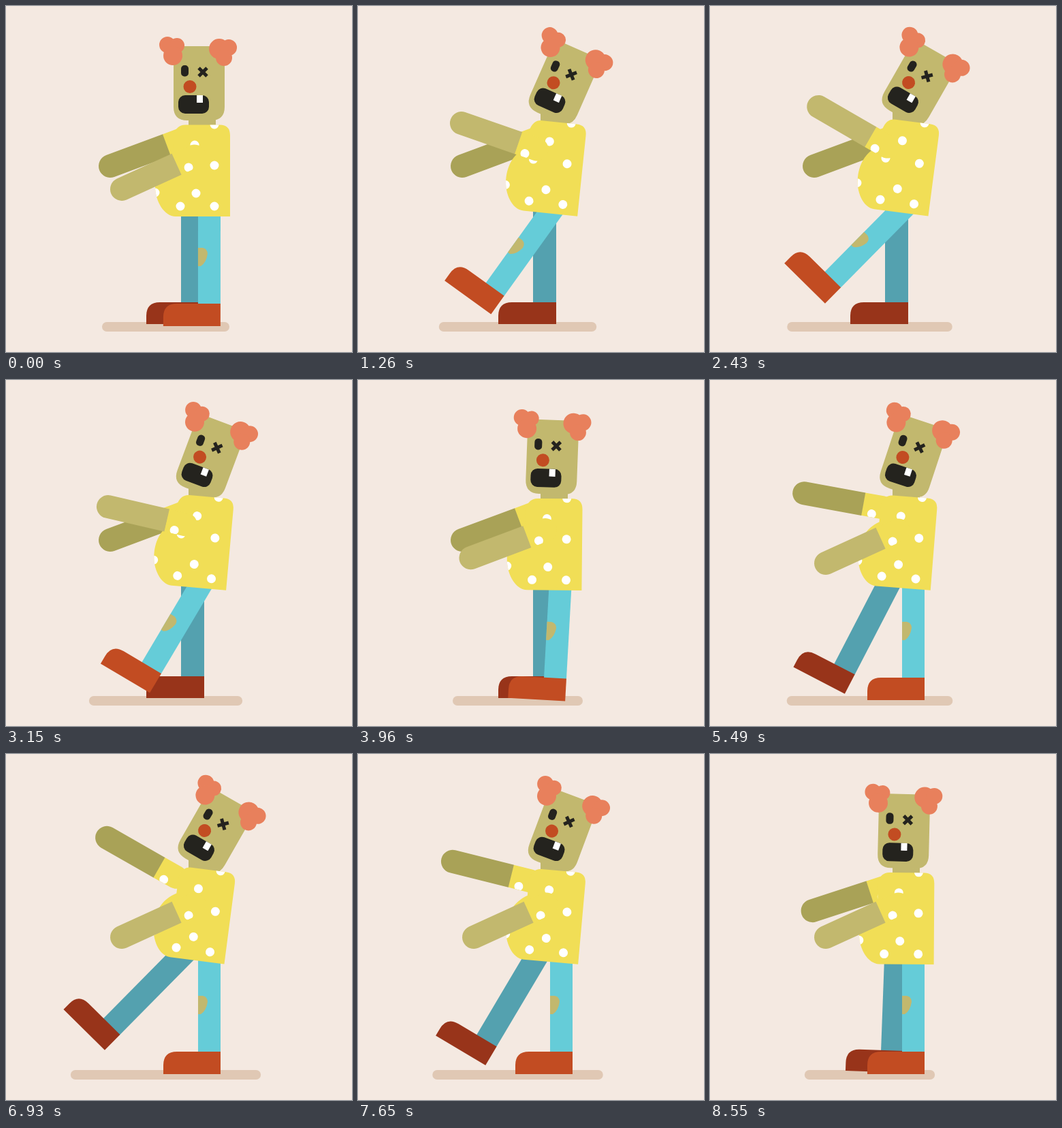
These frames come from a looping animation (508x508 px, 8640 ms). An HTML page:

```html
<!DOCTYPE html>
<html lang="en">
<head>
<meta charset="utf-8">
<title>Walking zombie clown</title>
<style>
  html, body { margin: 0; width: 100%; height: 100%; overflow: hidden; background: #f4e9e1; }
  svg { display: block; width: 100%; height: 100%; }
  .skin { fill: #c2b86e; }
  .skin-dark { fill: #a9a257; }
  .shirt { fill: #f1de56; }
  .dot { fill: #fff; }
  .ink { fill: #24231e; }
  .hair { fill: #e8805c; }
  .red { fill: #c24c22; }
</style>
</head>
<body>
<svg viewBox="0 0 508 508">
  <defs>
    <path id="torso" d="M263 174.500H314Q329 174.500 329 190V309H249C232 309 219 286 219 265C219 243 227 226 246 215V190Q250 174.500 263 174.500Z"/>
    <path id="sleeve" d="M88 -17H117A17 17 0 0 1 117 17H88Z"/>
    <path id="forearm" d="M88.500 -17H0A17 17 0 0 0 0 17H88.500Z"/>
    <clipPath id="torsoClip"><use href="#torso"/></clipPath>
    <clipPath id="sleeveClip"><use href="#sleeve"/></clipPath>
  </defs>

  <rect id="shadow" y="464" height="14" rx="7" fill="#e0c8b4"/>

  <g id="farArm">
    <g transform="translate(153 235) rotate(-20.400)">
      <use href="#sleeve" class="shirt"/>
      <circle class="dot" cx="103" cy="12" r="6.500" clip-path="url(#sleeveClip)"/>
      <use href="#forearm" class="skin-dark"/>
    </g>
  </g>

  <g id="farLeg">
    <rect x="257" y="273" width="34" height="163" fill="#54a1af"/>
    <path d="M206 467V455Q206 435 226 435H291V467Z" fill="#98341a"/>
  </g>

  <g id="nearLeg">
    <rect x="282" y="275" width="33" height="163" fill="#65ccd8"/>
    <path class="skin" d="M282 355H289Q296 357 296 364Q294 377 286 382H282Z"/>
    <path class="red" d="M231 470V457Q231 437 251 437H315V470Z"/>
  </g>

  <rect class="skin" x="268" y="150" width="40" height="28"/>

  <g id="head">
    <path class="skin" d="M250 59H317Q321 59 321 63V148Q321 168 301 168H266Q246 168 246 148V63Q246 59 250 59Z"/>
    <g class="hair">
      <circle cx="237" cy="57" r="12"/><circle cx="251" cy="58" r="11"/><circle cx="245" cy="73" r="14"/>
      <circle cx="313" cy="63" r="15"/><circle cx="327" cy="61" r="12"/><circle cx="320" cy="76" r="12"/>
    </g>
    <rect class="ink" x="257" y="87" width="11" height="16.500" rx="5"/>
    <path d="M283 91L295 103M295 91L283 103" stroke="#24231e" stroke-width="5"/>
    <circle class="red" cx="270" cy="118.500" r="9.500"/>
    <rect class="ink" x="253" y="131" width="45" height="27" rx="10"/>
    <rect class="dot" x="280" y="131" width="9" height="11"/>
  </g>

  <g id="body">
    <use href="#torso" class="shirt"/>
    <g id="dots" class="dot" clip-path="url(#torsoClip)"></g>
  </g>

  <g id="nearArm">
    <g transform="translate(170 269) rotate(-24.500)">
      <use href="#sleeve" class="shirt"/>
      <circle class="dot" cx="102.500" cy="11.600" r="6.500" clip-path="url(#sleeveClip)"/>
      <use href="#forearm" class="skin"/>
    </g>
  </g>
</svg>
<script>
  const LOOP = 8640, RISE = 2160, PEAK = 2250, FALL = 2250;
  const NEAR_START = 0, FAR_START = 4590, FAR_PEAK = 6750;
  const el = id => document.getElementById(id);

  const shirtDots = [[306, 174], [306, 234], [306, 294], [277, 204], [279, 275],
                     [256, 294], [219, 274], [256, 232.5]];
  el('dots').innerHTML = shirtDots
    .map(([x, y]) => `<circle cx="${x}" cy="${y}" r="6.5"/>`).join('');

  // Each joint: pivot and the angle reached at full swing.
  const joints = {
    nearLeg: [282.5, 275.5, 45],
    farLeg: [257.3, 273, 45],
    nearArm: [282, 198, 55],
    farArm: [270.5, 173.7, 50.5],
    head: [292.2, 156, 30],
    body: [328, 243, 7.5]
  };

  const clamp = v => Math.min(1, Math.max(0, v));

  // Cubic Bezier easing with handles (0.55, 0) and (0.4, 1).
  function easeFall(x) {
    let lo = 0, hi = 1;
    for (let i = 0; i < 24; i++) {
      const s = (lo + hi) / 2, r = 1 - s;
      if (1.65 * s * r * r + 1.2 * s * s * r + s * s * s < x) lo = s; else hi = s;
    }
    return lo * lo * (3 - 2 * lo);
  }

  function swing(t, start, peak) {
    return t < peak
      ? Math.sin(clamp((t - start) / RISE) * Math.PI / 2)
      : 1 - easeFall(clamp((t - peak) / FALL));
  }

  function turn(id, amount) {
    const [x, y, angle] = joints[id];
    el(id).setAttribute('transform', `rotate(${angle * amount} ${x} ${y})`);
  }

  function draw(t) {
    const near = swing(t, NEAR_START, PEAK);
    const far = swing(t, FAR_START, FAR_PEAK);
    const lean = Math.max(near, far);
    turn('nearLeg', near);
    turn('nearArm', near);
    turn('farLeg', far);
    turn('farArm', far);
    turn('head', lean);
    turn('body', lean);
    const half = 93.5 + 28 * near + 46.5 * far;
    el('shadow').setAttribute('x', 234.5 - half);
    el('shadow').setAttribute('width', 2 * half);
  }

  const begin = performance.now();
  function tick() {
    draw((performance.now() - begin) % LOOP);
    requestAnimationFrame(tick);
  }
  tick();
</script>
</body>
</html>
```
